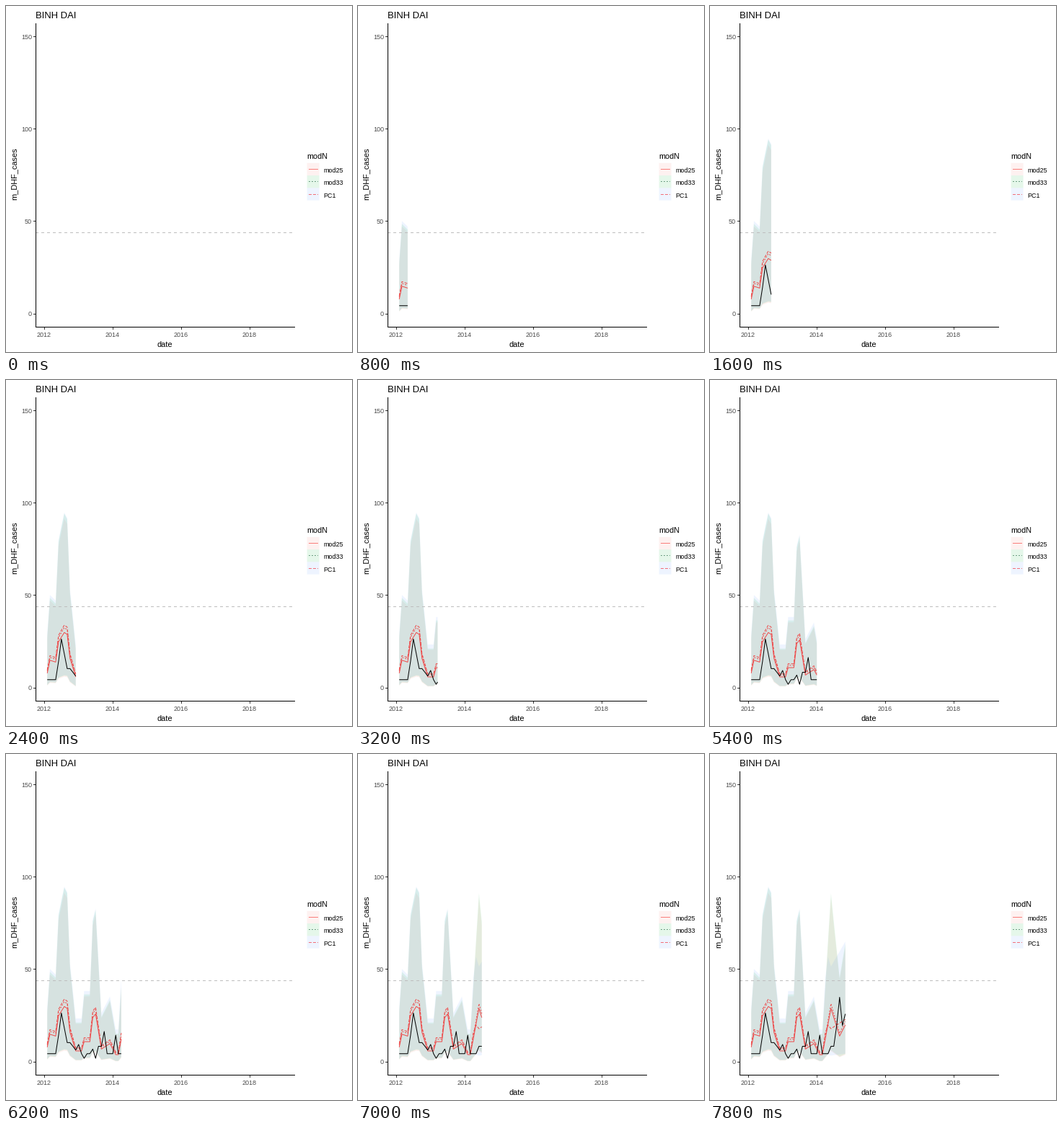
Animation of 480 by 480 pixels, one loop 8000 ms. Source, as a matplotlib script:

```python
import numpy as np
import matplotlib.pyplot as plt
from matplotlib.animation import FuncAnimation
from matplotlib.patches import Polygon, Rectangle

plt.rcParams["font.family"] = "Liberation Sans"
SIZE, DPI = 480, 72          # at 72 dpi one point is one pixel
FRAMES, STEP = 40, 200
PX_PER_DAY = 0.13
MONTHS = 34
GREY, LINE = "#4D4D4D", "#EE4A4A"

k = np.arange(MONTHS)        # months since February 2012
dates = np.datetime64("2012-02") + k
days = (dates.astype("datetime64[D]") - np.datetime64("2012-02-01")).astype(int)
# Each month lands on a whole frame; frames in between are interpolated
slots = np.round(days * 99 / 2526)
xs = 57.2 + PX_PER_DAY * days


def spikes(base, *parts):
    """Flat level plus triangular outbreaks (centre, height, half width)."""
    return base + sum(h * np.maximum(0, 1 - abs(k - c) / w) for c, h, w in parts)


observed = spikes(4.5, (5, 20, 2), (7.5, 7, 3.5), (11, 5, 1), (13, -2.5, 1),
                  (16, 2.5, 1), (17, -2.5, 1), (18.5, 6, 1.5), (20, 12, 1),
                  (24, 10, 1), (28.5, 6, 1.5), (31, 30.5, 2), (33, 21.5, 1))

# Seasonal turning points of the first model; the others follow from it
turns = [(0, 8), (1, 15), (3, 14), (4, 25), (6, 30), (7, 29), (8, 16), (10, 6),
         (12, 6), (13, 11), (15, 11), (16, 24), (17, 26), (19, 7), (22, 10),
         (24, 4), (25, 4), (28, 29), (31, 14), (33, 20)]
mean25 = np.interp(k, *zip(*turns))
mean33 = 1.07 * mean25 + 0.5
late = np.clip((k - 25) / 3, 0, 1)
mean_pc = (1 - late) * (1.1 * mean25 + 1) + late * np.interp(k, [28, 33], [18, 23])
high25 = 2.95 * mean25 + 3
high33 = 1.03 * high25
high_pc = 2.7 * mean_pc + 3


def to_y(v):
    return 427.3 - 2.567 * np.asarray(v, float)


def reveal(values, n):
    return np.append(values[slots <= n], np.interp(n, slots, values))


fig = plt.figure(figsize=(SIZE / DPI, SIZE / DPI), dpi=DPI, facecolor="white")
ax = fig.add_axes([0, 0, 1, 1])
ax.set_xlim(0, SIZE)
ax.set_ylim(SIZE, 0)
ax.axis("off")


def stroke(x, y, color="black", dash="-", z=3):
    return ax.plot(x, y, color=color, lw=1, ls=dash, zorder=z, snap=False,
                   solid_capstyle="butt", dash_capstyle="butt")[0]


def label(x, y, s, size, color="black", ha="left", va="baseline", **kw):
    ax.text(x, y, s, fontsize=size, color=color, ha=ha, va=va, **kw)


# Axes
stroke([41.5, 41.5], [24, 446], z=6)
stroke([41, 401], [445.5, 445.5], z=6)
for v in range(0, 151, 50):
    y = np.floor(to_y(v)) + 0.5
    stroke([38, 41], [y, y], "#333333")
    label(36, y + 3, str(v), 9, GREY, "right")
for i in range(4):
    x = 53.5 + 95 * i
    stroke([x, x], [446, 449], "#333333")
    label(x - 0.8, 459, str(2012 + 2 * i), 9, GREY, "center")
label(41, 17, "BINH DAI", 13)
label(220.5, 473, "date", 11, ha="center")
label(11.5, 233, "m_DHF_cases", 11, ha="center", va="center", rotation=90)
stroke([41, 400], [314.5, 314.5], "#BEBEBE", (0, (4, 4)), z=5)

# Legend, ribbons and model lines
models = [("mod25", mean25, high25, "#F8766D", "-", "#FA7F7C"),
          ("mod33", mean33, high33, "#00BA38", (0, (2, 2)), "#6F9F84"),
          ("PC1", mean_pc, high_pc, "#619CFF", (0, (4, 2)), "#F2707A")]
label(417.6, 212, "modN", 10.8)
ribbons, lines = [], []
for i, (name, mean, high, fill, dash, key) in enumerate(models):
    top = 217.8 + 17.28 * i
    ax.add_patch(Rectangle((417.6, top), 17, 17.28, fc=fill, alpha=0.1, lw=0,
                           snap=False))
    y = np.floor(top + 8.64) + 0.5
    stroke([420, 433], [y, y], key, dash)
    label(440.7, y + 4.5, name, 9)

    low = np.maximum(0.22 * mean - 0.5, 0.3)
    band = Polygon(np.zeros((3, 2)), closed=True, fc=fill, ec="none", alpha=0.1,
                   lw=0, snap=False, zorder=2)
    ax.add_patch(band)
    ribbons.append((band, to_y(low), to_y(high)))
    lines.append((stroke([], [], LINE, dash), to_y(mean)))
lines.append((stroke([], [], z=4), to_y(observed)))


def draw(n):
    x = reveal(xs, n)
    for band, low, high in ribbons:
        upper = np.column_stack([x, reveal(high, n)])
        lower = np.column_stack([x, reveal(low, n)])
        band.set_xy(np.vstack([upper, lower[::-1]]))
        band.set_visible(n > 0)
    for line, y in lines:
        line.set_data(x, reveal(y, n))
        line.set_visible(n > 0)
    return [artist for artist, *_ in ribbons + lines]


anim = FuncAnimation(fig, draw, frames=FRAMES, interval=STEP, repeat=True,
                     repeat_delay=0, blit=False)
plt.show()
```
